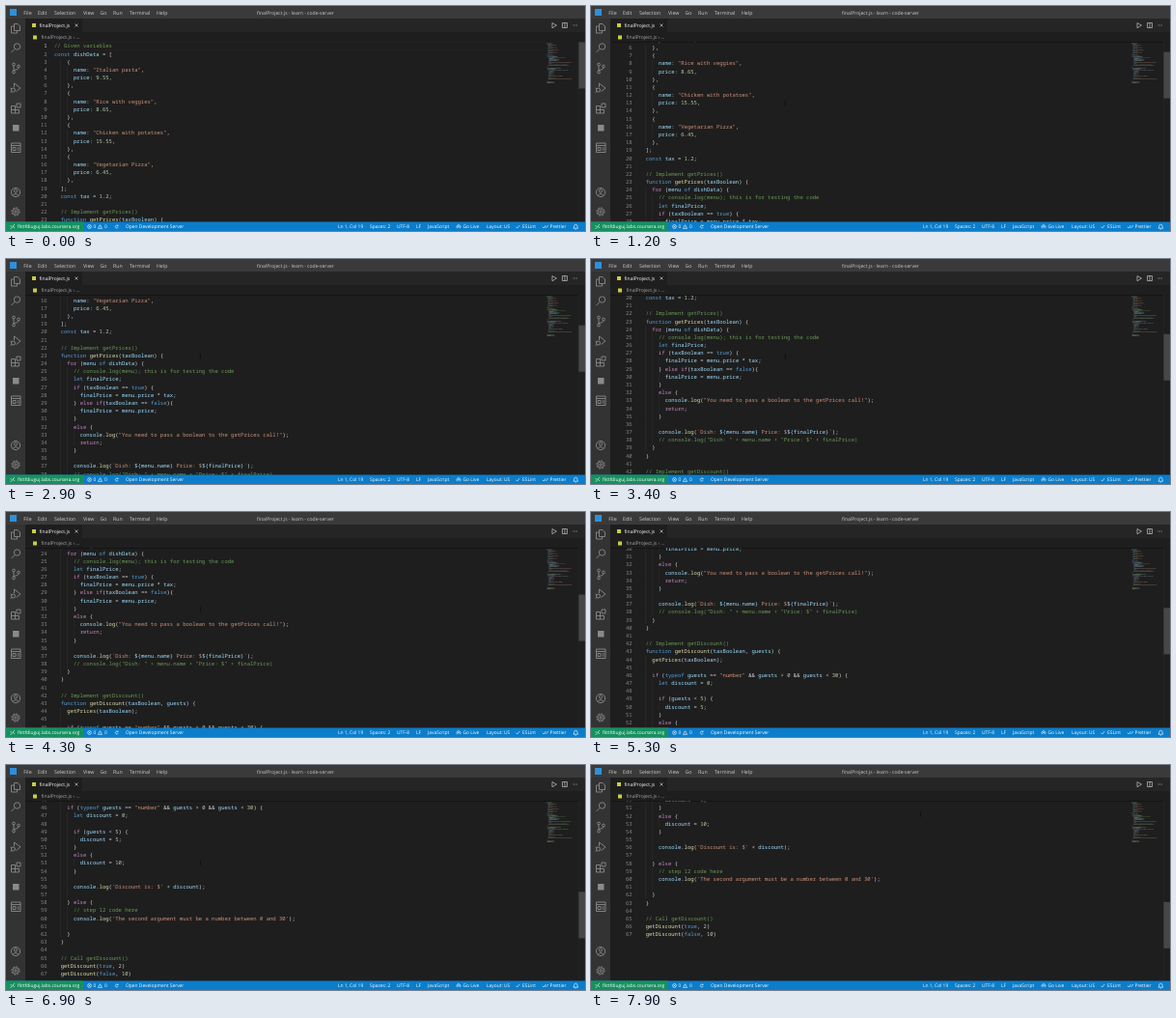
An HTML page for the animation above (8 s loop, 600 by 233 pixels).

```html
<!DOCTYPE html>
<html lang="en">
<head>
<meta charset="utf-8">
<title>Code editor scrolling</title>
<style>
html, body { margin: 0; width: 100%; height: 100%; overflow: hidden; background: #1e1e1e; }
svg { display: block; width: 600px; height: 233px; }
text { text-rendering: geometricPrecision; white-space: pre; }
#editor text { font: 500 5.55px "Noto Sans Mono", "DejaVu Sans Mono", monospace; }
.ui { font: 5.25px "Open Sans", "Noto Sans", sans-serif; fill: #ccc; }
.status { font-size: 4.9px; fill: #fff; }
.file { font-size: 5.05px; }
.icon { fill: none; stroke: #8a8a8a; stroke-width: .9; }
</style>
</head>
<body>
<svg viewBox="0 0 600 233">
  <rect width="600" height="233" fill="#1e1e1e"/>
  <g id="editor">
    <g id="code"><path d="M46 37.4H558M46 45.6H558" stroke="#282828" stroke-width=".6"/></g>
    <g id="map" opacity=".55"></g>
    <path d="M593.4 37V223" stroke="#343434" stroke-width=".4"/>
    <rect id="thumb" x="593.5" y="37.5" width="6.5" height="48" fill="#797979" opacity=".45"/>
    <path id="mouse" d="M-.8-2H.8M0-2V2M-.8 2H.8" stroke="#000" stroke-width=".6" opacity=".7"/>
  </g>

  <rect y="27" x="20" width="580" height="10" fill="#1e1e1e"/>
  <rect id="shadow" y="37" x="20" width="573" height="1" opacity=".35"/>
  <rect width="600" height="13" fill="#3a3a3b"/>
  <rect y="13" x="20" width="580" height="14" fill="#252526"/>
  <rect y="13" x="20" width="59" height="14" fill="#1e1e1e"/>
  <rect y="13" width="20" height="211" fill="#333"/>
  <rect y="223.5" width="600" height="9.5" fill="#0b7dca"/>
  <rect y="223.5" width="80" height="9.5" fill="#16905f"/>
  <rect x="4" y="3" width="7" height="7" fill="#2f8fd8"/>
  <rect x="27" y="18" width="4" height="4" fill="#cbcb41"/>
  <rect x="28" y="30.5" width="4" height="4" fill="#cbcb41"/>
  <rect x="7" y="123" width="6.5" height="6.5" fill="#8a8a8a"/>

  <g class="icon">
    <path d="M8.5 18.5H12L14.5 21V25.5H8.5ZM8 21H5.5V28H11.5V26"/>
    <path d="M9 44.5L5.5 48"/><circle cx="11.5" cy="42" r="3.2"/>
    <circle cx="8" cy="60.5" r="1.4"/><circle cx="13" cy="62.5" r="1.4"/><circle cx="8" cy="68.5" r="1.4"/>
    <path d="M8 62V67M13 64Q13 66 8 66.5"/>
    <path d="M8.5 84V80L15 85L10.5 88.5"/><circle cx="7.5" cy="87" r="2"/><path d="M4.5 85L6 86M4.5 89.5L6 88.5"/>
    <path d="M5.5 103.5H9.5V111H5.5ZM9.5 107.5H13.5V111H9.5M5.5 107.5H9.5M11 101H15V105H11Z"/>
    <path d="M5.5 142H15V151.5H5.5ZM5.5 144.5H15M7 146.5H10V149.5H7ZM11.5 147H14M11.5 149H14"/>
    <circle cx="10" cy="193" r="4.6"/><circle cx="10" cy="191.5" r="1.6"/><path d="M7 196.5Q10 192.5 13 196.5"/>
    <circle cx="10" cy="213" r="3.2"/><circle cx="10" cy="213" r="1.2"/>
    <circle cx="10" cy="213" r="4.2" stroke-dasharray="1.65"/>
  </g>
  <g class="icon" style="stroke:#c5c5c5;stroke-width:.7">
    <path d="M566 17.5L570.5 20L566 22.8ZM576.5 17.5H581.5V22.5H576.5ZM579 17.5V22.5"/>
    <path d="M587.5 20H592" stroke-dasharray=".9"/>
    <path d="M71.5 18.5L74.5 21.5M74.5 18.5L71.5 21.5"/>
  </g>
  <g class="icon" style="stroke:#fff;stroke-width:.6">
    <path d="M4.5 227L6.5 229L4.5 231M9 226L7 228L9 230"/>
    <circle cx="86.5" cy="228.5" r="1.9"/><path d="M85.7 227.7L87.3 229.3M87.3 227.7L85.7 229.3"/>
    <path d="M95.5 230.4L97.5 226.7L99.5 230.4Z"/>
    <path d="M116 227.6A1.5 1.5 0 1 0 116.2 229.2M116.2 226.8V227.8H115.2"/>
    <circle cx="469" cy="228.5" r=".7"/><path d="M467.7 230.2A2 2 0 1 1 470.3 230.2"/>
    <path d="M528.5 228.7L529.8 230L532.2 227M556 228.7L557.2 230L559.5 227M559 229.5L559.5 230L562 227"/>
    <path d="M588 230.2L588.7 229V228A1.7 1.7 0 0 1 592.1 228V229L592.8 230.2ZM589.8 231.1H591"/>
  </g>
  <g id="ui" class="ui"></g>
</svg>

<script>
const source = `// Given variables
const dishData = [
${[["Italian pasta", "9.55"], ["Rice with veggies", "8.65"], ["Chicken with potatoes", "15.55"], ["Vegetarian Pizza", "6.45"]]
  .map(([name, price]) => `    {
      name: "${name}",
      price: ${price},
    },`).join("\n")}
  ];
  const tax = 1.2;

  // Implement getPrices()
  function getPrices(taxBoolean) {
    for (menu of dishData) {
      // console.log(menu); this is for testing the code
      let finalPrice;
      if (taxBoolean == true) {
        finalPrice = menu.price * tax;
      } else if(taxBoolean == false){
        finalPrice = menu.price;
      }
      else {
        console.log("You need to pass a boolean to the getPrices call!");
        return;
      }

      console.log(\`Dish: \${menu.name} Price: $\${finalPrice}\`);
      // console.log("Dish: " + menu.name + "Price: $" + finalPrice)
    }
  }

  // Implement getDiscount()
  function getDiscount(taxBoolean, guests) {
    getPrices(taxBoolean);

    if (typeof guests == "number" && guests > 0 && guests < 30) {
      let discount = 0;

      if (guests < 5) {
        discount = 5;
      }
      else {
        discount = 10;
      }

      console.log('Discount is: $' + discount);

    } else {
      // step 12 code here
      console.log('The second argument must be a number between 0 and 30');

    }
  }

  // Call getDiscount()
  getDiscount(true, 2)
  getDiscount(false, 10)`;

const $ = id => document.getElementById(id);
const PITCH = 8.18, CHAR = 3.33, LEFT = 50, BASE = 43.4;

function add(parent, tag, attrs, text = "") {
  const el = document.createElementNS("http://www.w3.org/2000/svg", tag);
  for (const key in attrs) el.setAttribute(key, attrs[key]);
  el.textContent = text;
  return parent.appendChild(el);
}

// One colour per capture group
const TOKEN = /(\/\/.*)|("[^"]*"|'[^']*'|`[^`]*`)|\b(const|function|let|true|false|typeof|of)\b|\b(for|if|else|return)\b|(\d[\d.]*)|([a-z]\w*(?=\())|([a-z]\w*)|([^\s\w])/gi;
const COLORS = ["#6a9955", "#ce9178", "#569cd6", "#c586c0", "#b5cea8", "#dcdcaa", "#9cdcfe", "#d4d4d4"];

function drawToken(text, col, row, fill) {
  add($("code"), "text", { x: LEFT + col * CHAR, y: BASE + row * PITCH, fill }, text);
  add($("map"), "rect", { x: 560 + col * .35, y: 38.5 + row * .62, width: text.length * .35, height: .42, fill });
}

let depth = 0;
source.split("\n").forEach((line, row) => {
  if (line) depth = line.search(/\S/);
  for (let col = 2; col < depth; col += 2)
    add($("code"), "rect", { x: LEFT + col * CHAR, y: 37.4 + row * PITCH, width: .4, height: PITCH, fill: "#363636" });
  add($("code"), "text", { x: 42.6, y: BASE + row * PITCH, "text-anchor": "end", fill: row ? "#858585" : "#c6c6c6" }, row + 1);
  for (const match of line.matchAll(TOKEN)) {
    const kind = match.slice(1).findIndex(Boolean);
    let col = match.index;
    const parts = match[0][0] == "`" ? match[0].split(/(\$\{[^}]*\})/) : [match[0]];
    parts.forEach((part, i) => {
      drawToken(part, col, row, COLORS[i % 2 ? 6 : kind]);
      col += part.length;
    });
  }
});

function label(x, y, text, attrs) { add($("ui"), "text", { x, y, ...attrs }, text); }

[[18.3, "File"], [33, "Edit"], [50, "Selection"], [80, "View"], [97.5, "Go"], [111, "Run"], [128, "Terminal"], [156, "Help"]]
  .forEach(([x, text]) => label(x, 8.6, text));
label(260, 8.6, "finalProject.js - learn - code-server", { class: "file" });
label(34.6, 22, "finalProject.js", { class: "file", fill: "#fff" });
label(36.6, 34.4, "finalProject.js › ...", { class: "file", fill: "#a9a9a9" });
[[12, "fkttfdiuguj.labs.coursera.org"], [90.5, "0"], [102, "0"], [124, "Open Development Server"], [344, "Ln 1, Col 19"],
 [377, "Spaces: 2"], [405, "UTF-8"], [425, "LF"], [437, "JavaScript"], [473.5, "Go Live"], [498, "Layout: US"],
 [535, "ESLint"], [563.5, "Prettier"]]
  .forEach(([x, text]) => label(x, 230.4, text, { class: "status" }));

// [time, scroll offset]
const SCROLL = [[0, 0], [2200, 72], [3400, 156.8], [4300, 187], [5300, 240.6], [6300, 320], [7200, 388], [7700, 406], [8000, 406]];

function scrollAt(t) {
  const i = SCROLL.findIndex(([time]) => time > t);
  const [t0, s0] = SCROLL[i - 1], [t1, s1] = SCROLL[i];
  return s0 + (s1 - s0) * (t - t0) / (t1 - t0);
}

function frame(now) {
  const t = Math.floor(now % 8000 / 100) * 100;
  const s = scrollAt(t);
  const k = Math.min(1, Math.max(0, (t - 7200) / 500));
  $("code").setAttribute("transform", `translate(0 ${-s})`);
  $("thumb").setAttribute("y", 37.5 + s * .257);
  $("mouse").setAttribute("transform", `translate(${201.5 + 140 * k} ${101 - 50 * k})`);
  $("mouse").style.display = $("shadow").style.display = t ? "" : "none";
  requestAnimationFrame(frame);
}
frame(0);
</script>
</body>
</html>
```
